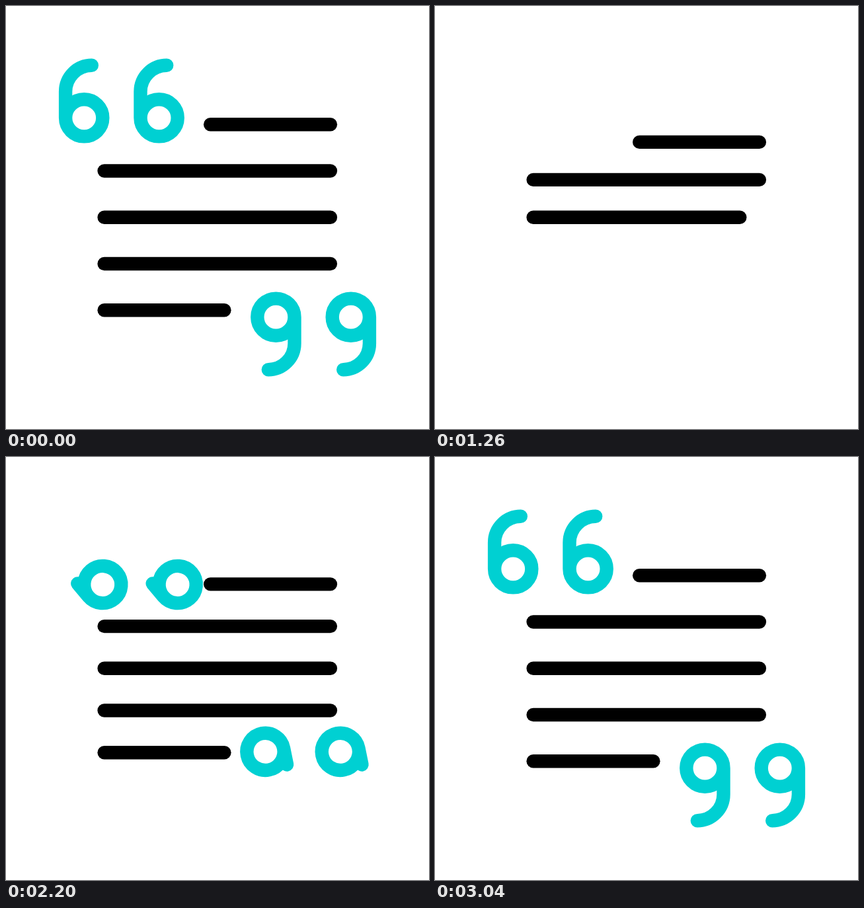
Write an HTML page with a canvas that moves like this. It is 640x640 px and loops after 3.6 s.

```html
<!DOCTYPE html>
<html>
<head>
<meta charset="utf-8">
<style>
html, body { margin: 0; width: 100%; height: 100%; overflow: hidden; background: #fff; }
canvas { display: block; }
</style>
</head>
<body>
<canvas id="stage" width="640" height="640"></canvas>
<script>
const ctx = document.getElementById('stage').getContext('2d');
const LOOP = 3600;
const TEAL = '#00d0d2';

const clamp = v => Math.min(1, Math.max(0, v));
const easeIn = (t, end, power) => clamp(t / end) ** power;
// Falls from 1 to 0 with a soft landing.
const settle = (t, start, end, power = 2) => clamp((end - t) / (end - start)) ** power;

// Opening quote mark around its own centre: hook, stem, ring.
const HOOK = 39.7, STEM = 39.8, RING = 28.1;
const mark = new Path2D();
mark.arc(11.8, -14, HOOK, -Math.PI / 2, -Math.PI, true);
mark.lineTo(-27.9, 25.8);
mark.arc(0.2, 25.8, RING, Math.PI, -Math.PI, true);
const markLength = HOOK * Math.PI / 2 + STEM + RING * 2 * Math.PI;

const LEFT = 148.6, RIGHT = 490.9;
const lines = [[309.2, RIGHT], [LEFT, RIGHT], [LEFT, RIGHT], [LEFT, RIGHT], [LEFT, 330.4]];
const textLength = lines.reduce((sum, [a, b]) => sum + b - a, 0);

function drawLines(from, to, gap) {
  ctx.strokeStyle = '#000';
  let start = 0;
  lines.forEach(([a, b], i) => {
    const x1 = a + Math.max(0, from * textLength - start);
    const x2 = Math.min(b, a + to * textLength - start);
    start += b - a;
    if (x2 <= x1) return;
    const y = 319.8 + (i - 2) * gap;
    ctx.beginPath();
    ctx.moveTo(x1, y);
    ctx.lineTo(x2, y);
    ctx.stroke();
  });
}

function drawMark(x, y, degrees, trim) {
  ctx.save();
  ctx.translate(x, y);
  ctx.rotate(degrees * Math.PI / 180);
  ctx.setLineDash([(1 - trim) * markLength + 0.01, markLength * 2]);
  ctx.lineDashOffset = -trim * markLength;
  ctx.stroke(mark);
  ctx.restore();
}

function draw(t) {
  ctx.clearRect(0, 0, 640, 640);
  ctx.lineWidth = 20.4;
  ctx.lineCap = 'round';
  ctx.lineJoin = 'round';

  const leaving = t < 850;
  if (leaving) drawLines(easeIn(t, 662, 2), 1, 70.25);
  else drawLines(0, 1 - settle(t, 850, 1964), 70.25 - 13.3 * settle(t, 1950, 2790));

  const turn = leaving ? easeIn(t, 872, 1.8) : settle(t, 1765, 3040, 1.93);
  const trim = leaving ? easeIn(t, 827, 1.88) : settle(t, 1824, 2615);
  if (trim >= 1) return;
  ctx.strokeStyle = TEAL;
  for (const shift of [0, 113.4]) {
    drawMark(118 + shift + 25.7 * turn, 143.5 + 67 * turn, -90 * turn, trim);
    drawMark(408.6 + shift - 24.2 * turn, 496.5 - 57 * turn, 180 - 25.8 * turn, trim);
  }
}

const began = performance.now();
function tick() {
  draw((performance.now() - began) % LOOP);
  requestAnimationFrame(tick);
}
tick();
</script>
</body>
</html>
```
